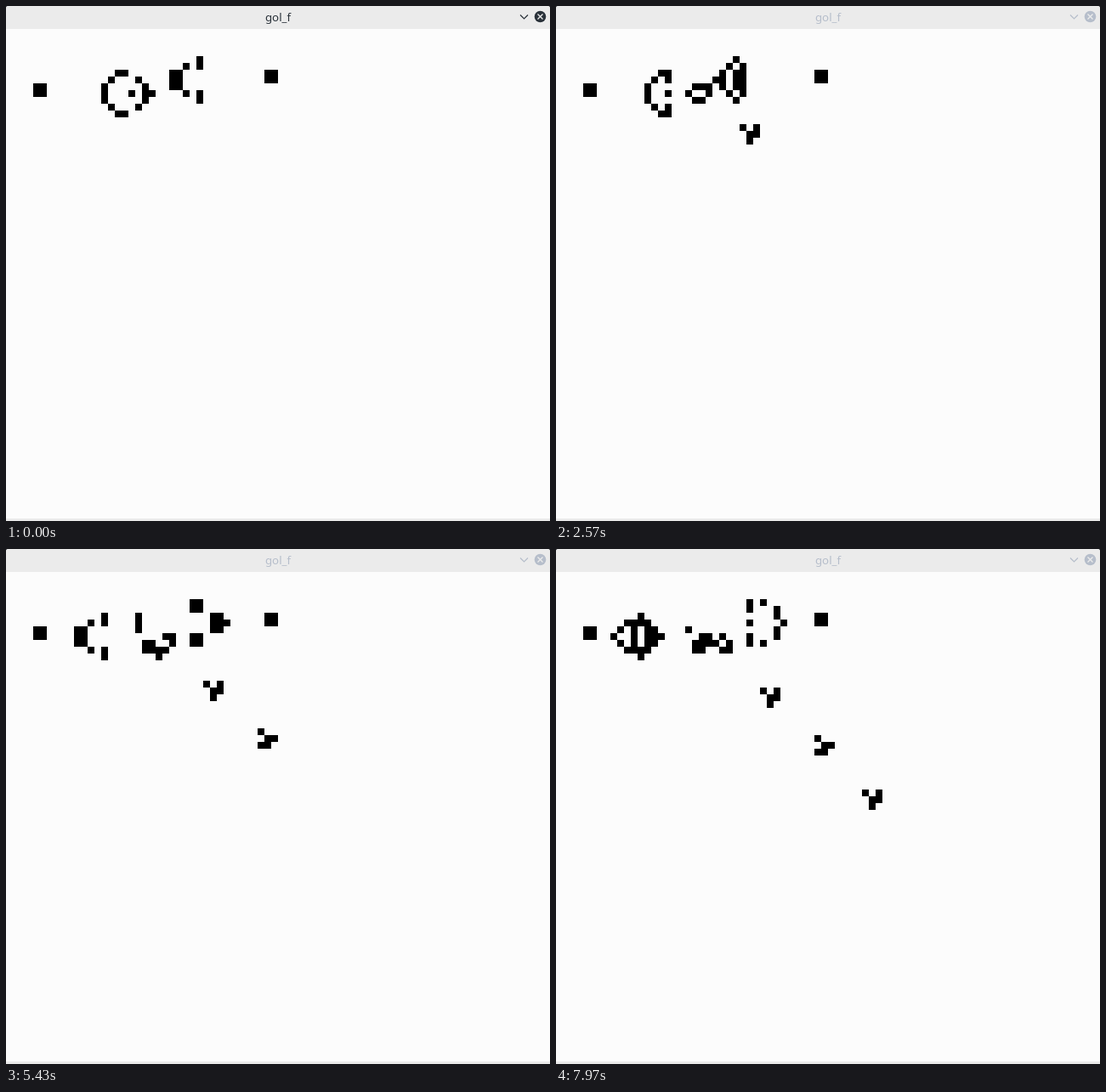
Write an HTML page with a canvas that moves like this. It is 640 px wide and 606 px high and loops after 8000 ms.

```html
<!DOCTYPE html>
<html lang="en">
<head>
<meta charset="utf-8">
<title>gol_f</title>
<style>
  html, body { margin: 0; width: 100%; height: 100%; overflow: hidden; background: #303336; }
  #win { position: absolute; left: 0; top: 0; width: 640px; height: 606px; overflow: hidden;
         border-radius: 3px 3px 0 0; background: #fcfcfc; }
  #bar { position: absolute; left: 0; top: 0; width: 640px; height: 27px; background: #ebebeb; }
  #bar span { position: absolute; left: 0; width: 640px; top: 4px; line-height: 18px; text-align: center;
              font-family: "Noto Sans", sans-serif; font-size: 13.33px; }
  #bar svg { position: absolute; left: 0; top: 0; }
  #edge { position: absolute; left: 0; top: 603px; width: 640px; height: 3px; background: #ebebeb; }
  canvas { position: absolute; left: 0; top: 27px; }
</style>
</head>
<body>
<div id="win">
  <div id="bar">
    <span>gol_f</span>
    <svg width="640" height="27" fill="none">
      <path d="M605 10.5l4.5 4.5 4.5-4.5" stroke="currentColor" stroke-width="1.2"/>
      <circle cx="628.5" cy="12.5" r="6.8" fill="currentColor"/>
      <path d="M625.5 9.5l6 6m0-6l-6 6" stroke="#ebebeb" stroke-width="1.3"/>
    </svg>
  </div>
  <canvas id="board" width="640" height="576"></canvas>
  <div id="edge"></div>
</div>
<script>
const COLS = 80, ROWS = 72, CELL = 8, LOOP = 8000;
const ctx = document.getElementById('board').getContext('2d');
const bar = document.getElementById('bar');

// Gosper glider gun: live columns of each row, placed at (4, 4)
const GUN = [[24], [22, 24], [12, 13, 20, 21, 34, 35], [11, 15, 20, 21, 34, 35],
  [0, 1, 10, 16, 20, 21], [0, 1, 10, 14, 16, 17, 22, 24], [10, 16, 24], [11, 15], [12, 13]];

// [time in ms, generation]: the simulation slows a little as it runs
const PACE = [[300, 1], [1470, 16.7], [2570, 32.2], [3730, 48.2],
  [5430, 70.5], [6630, 86.6], [8000, 105]];

function seed() {
  const grid = new Uint8Array(COLS * ROWS);
  GUN.forEach((row, y) => row.forEach(x => { grid[(y + 4) * COLS + x + 4] = 1; }));
  return grid;
}

function evolve(grid) {
  const next = new Uint8Array(grid.length);
  for (let y = 1; y < ROWS - 1; y++) {
    for (let x = 1; x < COLS - 1; x++) {
      const i = y * COLS + x;
      let n = -grid[i];
      for (let dy = -COLS; dy <= COLS; dy += COLS)
        n += grid[i + dy - 1] + grid[i + dy] + grid[i + dy + 1];
      next[i] = n === 3 || (n === 2 && grid[i]) ? 1 : 0;
    }
  }
  return next;
}

const states = [seed()];
while (states.length < 106) states.push(evolve(states[states.length - 1]));

function generation(t) {
  if (t < PACE[0][0]) return 0;
  const k = PACE.findIndex(p => t < p[0]);
  const [t0, g0] = PACE[k - 1], [t1, g1] = PACE[k];
  return Math.floor(g0 + (g1 - g0) * (t - t0) / (t1 - t0));
}

function drawBoard(grid) {
  ctx.clearRect(0, 0, COLS * CELL, ROWS * CELL);
  ctx.fillStyle = '#000';
  grid.forEach((live, i) => {
    if (live) ctx.fillRect(i % COLS * CELL, Math.floor(i / COLS) * CELL, CELL, CELL);
  });
}

const ACTIVE = [42, 50, 58], INACTIVE = [182, 190, 203];

// The window loses focus: title and buttons fade
function tint(t) {
  const f = Math.min(1, Math.max(0, (t - 1200) / 150));
  return `rgb(${ACTIVE.map((c, i) => Math.round(c + (INACTIVE[i] - c) * f)).join(',')})`;
}

const start = performance.now();
let shown = -1;

function frame() {
  const t = Math.max(0, performance.now() - start) % LOOP;
  const gen = generation(t);
  if (gen !== shown) drawBoard(states[shown = gen]);
  bar.style.color = tint(t);
  requestAnimationFrame(frame);
}
frame();
</script>
</body>
</html>
```
